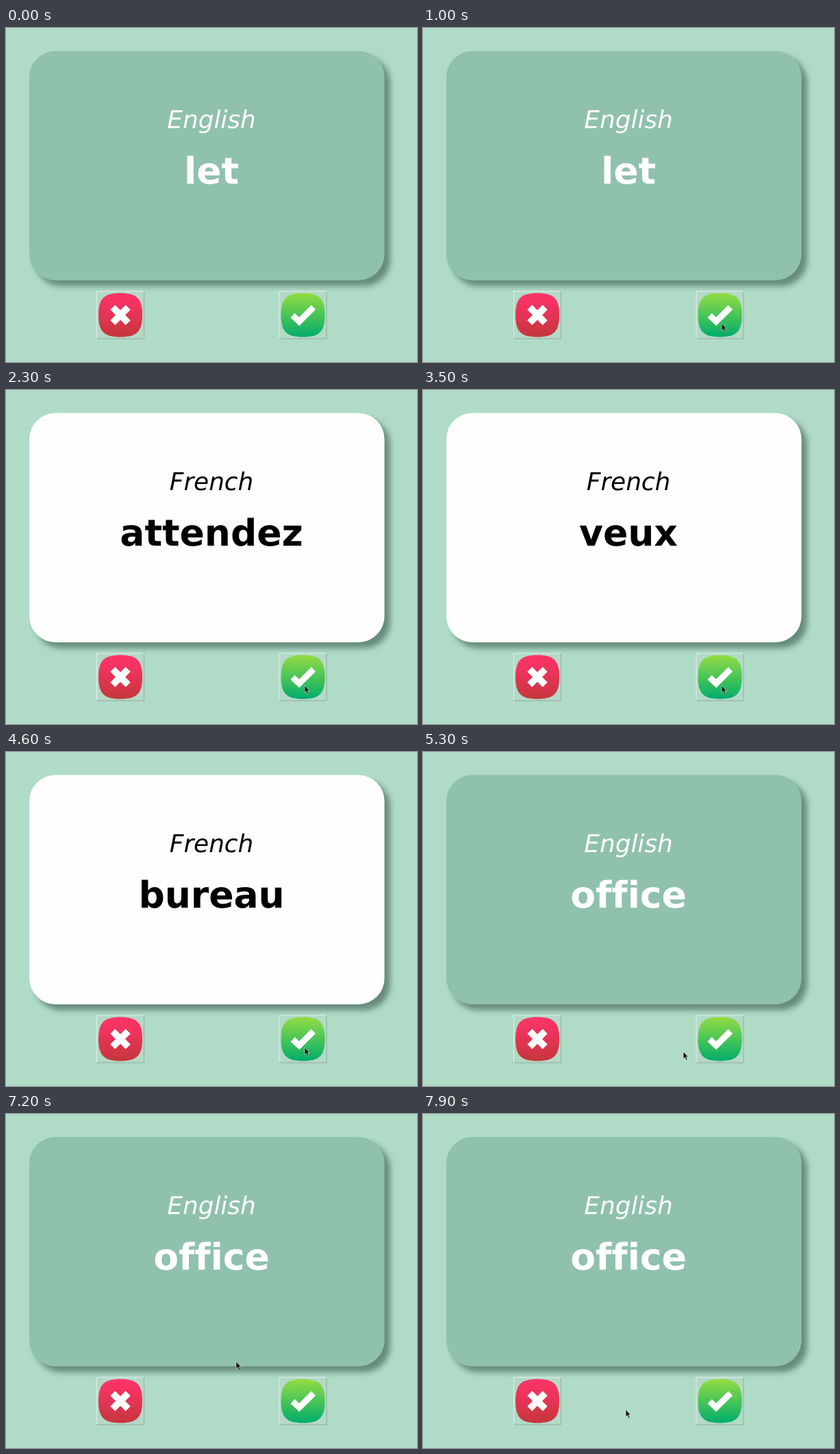
An HTML page for the animation above (8000 ms loop, 600 px wide and 487 px high).

```html
<!DOCTYPE html>
<html lang="en">
<head>
<meta charset="utf-8">
<title>Flash cards</title>
<style>
  html, body { margin: 0; width: 100%; height: 100%; overflow: hidden; background: #b0dcc7; }
  svg { display: block; width: 100vw; height: 100vh; }
  text {
    font-family: "DejaVu Sans", sans-serif;
    text-anchor: middle;
    font-variant-ligatures: none;
    text-rendering: geometricPrecision;
  }
  #lang { font-size: 35.8px; font-style: italic; }
  #word { font-size: 53.5px; font-weight: bold; }
  .mark { fill: none; stroke: #fff; }
  .edge { fill: none; stroke: #e4f0e9; }
  .edge.low, .down .edge { stroke: #94aa9e; }
  .down .edge.low { stroke: #e4f0e9; }
  .down .face { transform: translate(1px, 1px); }
</style>
</head>
<body>
<svg viewBox="0 0 600 487">
  <defs>
    <linearGradient id="red" x2="0" y2="1">
      <stop offset="0" stop-color="#fd3468"/>
      <stop offset=".35" stop-color="#ee335c"/>
      <stop offset="1" stop-color="#c5363b"/>
    </linearGradient>
    <linearGradient id="green" x2="0" y2="1">
      <stop offset="0" stop-color="#94dc42"/>
      <stop offset="1" stop-color="#00ad6c"/>
    </linearGradient>
    <filter id="blur" x="-10%" y="-10%" width="120%" height="120%">
      <feGaussianBlur stdDeviation="4"/>
    </filter>
    <path id="blob" d="M-32 0C-32-24-24-32 0-32S32-24 32 0 24 32 0 32-32 24-32 0Z"/>
    <g id="frame">
      <rect x="-35" y="-35" width="70" height="70" fill="#b4d9c7"/>
      <path class="edge" d="M-34.5 34.5V-34.5H34.5"/>
      <path class="edge low" d="M-34.5 34.5H34.5V-34.5"/>
    </g>
  </defs>

  <rect width="600" height="487" fill="#b0dcc7"/>
  <rect x="42" y="41.5" width="519" height="335" rx="38" fill="#2a4a3e" opacity=".55" filter="url(#blur)"/>
  <rect id="card" x="34" y="33.5" width="518.5" height="334.5" rx="38"/>
  <text id="lang" x="300" y="145.5"></text>
  <text id="word" x="300" y="227.2"></text>

  <g transform="translate(167 418.5)">
    <use href="#frame"/>
    <use href="#blob" fill="url(#red)"/>
    <path class="mark" stroke-width="10" d="M-11.2-11.2 11.2 11.2M11.2-11.2-11.2 11.2"/>
  </g>

  <g id="check" transform="translate(433.5 418.5)">
    <use href="#frame"/>
    <g class="face">
      <use href="#blob" fill="url(#green)"/>
      <path class="mark" stroke-width="9" d="M-15 .5-5.5 9.5 15.3-11.3"/>
    </g>
  </g>

  <path id="cursor" d="M0 0V10.4L2.3 8.3 4.2 12.4 6 11.6 4.1 7.7H7.2Z"
        fill="#101512" stroke="#e8f4ee" stroke-opacity=".7" stroke-width=".8"/>
</svg>
<script>
const LOOP = 8000, STEP = 100, HOLD = 200, FLIP = 3000;
const $ = id => document.getElementById(id);

// Each click on the check mark deals a new word when the button is released.
const clicks = [
  { at: 2300, word: "attendez" },
  { at: 3500, word: "veux" },
  { at: 4100, word: "dire" },
  { at: 4600, word: "bureau" }
];

// Pointer strokes through a few points; it rests in between.
const rest = [436, 431];
const strokes = [
  { from: 400, to: 500, points: [[471, 446], [456, 445]] },
  { from: 800, to: 1000, points: [[456, 445], rest] },
  { from: 1400, to: 1900, points: [rest, [460, 438], rest] },
  { from: 5200, to: 5800, points: [rest, [336, 441], [235, 440]], ease: 2 },
  { from: 5950, to: 7900, points: [[235, 440], [215, 383], [340, 362], [296, 431]] }
];

// Catmull-Rom curve through the points, u from 0 to 1
function spline(points, u) {
  const last = points.length - 1;
  const i = Math.min(Math.floor(u * last), last - 1);
  const k = u * last - i;
  const at = n => points[Math.max(0, Math.min(last, n))];
  return [0, 1].map(axis => {
    const [a, b, c, d] = [-1, 0, 1, 2].map(n => at(i + n)[axis]);
    return b + k / 2 * (c - a + k * (2 * a - 5 * b + 4 * c - d + k * (3 * (b - c) + d - a)));
  });
}

function pointer(t) {
  const stroke = strokes.filter(s => s.from <= t).pop();
  if (!stroke) return null;
  const { from, to, points, ease = 1 } = stroke;
  const u = Math.min(1, (t - from) / (to - from));
  return spline(points, 1 - (1 - u) ** ease);
}

function cardAt(t) {
  if (t >= clicks[0].at + FLIP) return ["English", "office"];
  const click = clicks.filter(c => c.at <= t).pop();
  return click ? ["French", click.word] : ["English", "let"];
}

function draw(time) {
  const t = Math.floor(time / STEP) * STEP;
  const [lang, word] = cardAt(t);
  const back = lang === "English";
  $("card").setAttribute("fill", back ? "#90c1ad" : "#fefefe");
  for (const [id, label] of [["lang", lang], ["word", word]]) {
    $(id).textContent = label;
    $(id).setAttribute("fill", back ? "#fff" : "#000");
  }

  const down = clicks.some(c => t >= c.at - HOLD && t < c.at);
  $("check").classList.toggle("down", down);

  const tip = pointer(t);
  $("cursor").setAttribute("visibility", tip ? "visible" : "hidden");
  if (tip) $("cursor").setAttribute("transform", `translate(${tip.map(Math.round).join(" ")})`);
}

const start = performance.now();
function tick() {
  draw((performance.now() - start) % LOOP);
  requestAnimationFrame(tick);
}
tick();
</script>
</body>
</html>
```
